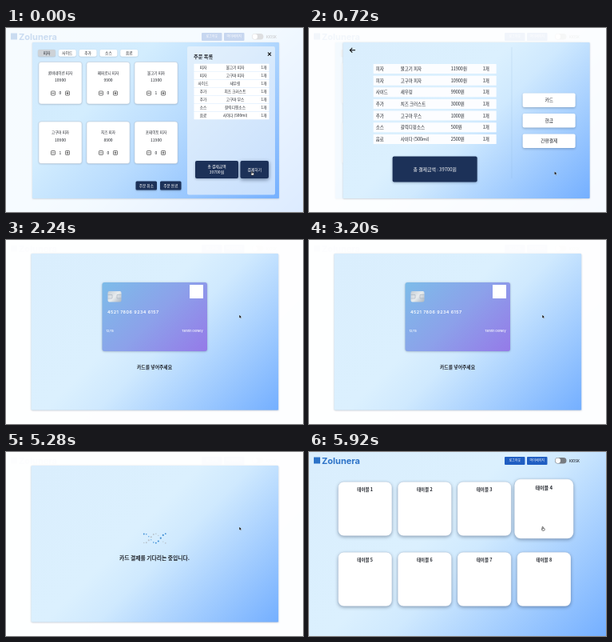
An HTML page with a canvas for the animation above (6 s loop, 372 by 230 pixels).

```html
<!DOCTYPE html>
<html lang="ko">
<head>
<meta charset="utf-8">
<title>Kiosk order</title>
<style>
html, body { margin: 0; width: 100%; height: 100%; overflow: hidden; background: #fff; }
canvas { display: block; width: 372px; height: 230px; }
</style>
</head>
<body>
<canvas id="stage"></canvas>
<script>
const W = 372, H = 230, LOOP = 6000;
const KR = '"Noto Sans CJK KR", "Noto Sans CJK", sans-serif';
const LATIN = 'Inter, sans-serif';
const NAVY = '#1c3158', INK = '#20242b';
const canvas = document.getElementById('stage');
const ctx = canvas.getContext('2d');
const dpr = window.devicePixelRatio || 1;
canvas.width = W * dpr;
canvas.height = H * dpr;

const menu = [
  ['콤비네이션 피자', 10900, 0], ['페퍼로니 피자', 9900, 0], ['불고기 피자', 11900, 1],
  ['고구마 피자', 10900, 1], ['치즈 피자', 8900, 0], ['포테이토 피자', 11900, 0]
];
const order = [
  ['피자', '불고기 피자', 11900], ['피자', '고구마 피자', 10900], ['사이드', '새우링', 9900],
  ['추가', '치즈 크러스트', 3000], ['추가', '고구마 무스', 1000],
  ['소스', '갈릭디핑소스', 500], ['음료', '사이다 (500ml)', 2500]
];

const clamp = v => Math.max(0, Math.min(1, v));
const span = (t, from, to) => clamp((t - from) / (to - from));
const easeOut = (p, n = 3) => 1 - (1 - p) ** n;
const easeInOut = p => p * p * (3 - 2 * p);

function text(str, x, y, size, { color = INK, weight = 500, align = 'center', font = KR, gap = 0 } = {}) {
  ctx.font = `${weight} ${size}px ${font}`;
  ctx.textAlign = align;
  ctx.textBaseline = 'alphabetic';
  ctx.letterSpacing = gap + 'px';
  ctx.fillStyle = color;
  ctx.fillText(str, x, y + size * 0.36);
  ctx.letterSpacing = '0px';
}

function box(x, y, w, h, r, fill, { shadow = 0, blur = 3, dy = 1, stroke } = {}) {
  ctx.save();
  if (shadow) {
    ctx.shadowColor = `rgba(30,50,80,${shadow})`;
    ctx.shadowBlur = blur * dpr;
    ctx.shadowOffsetY = dy * dpr;
  }
  ctx.beginPath();
  ctx.roundRect(x, y, w, h, r);
  ctx.fillStyle = fill;
  ctx.fill();
  ctx.restore();
  if (stroke) {
    ctx.strokeStyle = stroke;
    ctx.lineWidth = 0.6;
    ctx.stroke();
  }
}

function line(color, width, ...pts) {
  ctx.beginPath();
  pts.forEach(([x, y], i) => i ? ctx.lineTo(x, y) : ctx.moveTo(x, y));
  ctx.strokeStyle = color;
  ctx.lineWidth = width;
  ctx.stroke();
}

// Same geometry as a CSS 135deg gradient
function diagonal(x, y, w, h, stops) {
  const cx = x + w / 2, cy = y + h / 2, d = (w + h) / 4;
  const g = ctx.createLinearGradient(cx - d, cy - d, cx + d, cy + d);
  stops.forEach(([at, color]) => g.addColorStop(at, color));
  return g;
}

const sky = (x, y, w, h) => diagonal(x, y, w, h,
  [[0, '#daeefd'], [0.42, '#dbf0fe'], [0.55, '#cfe9fe'], [1, '#74afff']]);

function veil(alpha) {
  ctx.fillStyle = `rgba(255,255,255,${alpha})`;
  ctx.fillRect(0, 0, W, H);
}

function panel(x, y, w, h) {
  box(x, y, w, h, 1, sky(x, y, w, h), { shadow: 0.25, blur: 2, dy: 0.5 });
}

function page(t) {
  ctx.fillStyle = sky(0, 0, W, H);
  ctx.fillRect(0, 0, W, H);
  box(6, 6.5, 8, 8, 0, '#2d73c8');
  text('Zolunera', 16, 11, 11, { color: '#2d73c8', weight: 700, align: 'left', font: LATIN });
  ['로그아웃', '마이페이지'].forEach((label, i) => {
    box(245 + 28 * i, 6, 25.5, 10, 1, '#205ec2');
    text(label, 257.8 + 28 * i, 11, 4, { color: '#fff' });
  });
  box(308, 7, 14.5, 7.6, 3.8, '#777c82');
  box(308.6, 7.6, 6.4, 6.4, 3.2, '#fff');
  text('KIOSK', 326, 11, 4.2, { align: 'left', font: LATIN });
  if (t < 5360) return;
  for (let i = 0; i < 8; i++) {
    const cx = 70.2 + 74.7 * (i % 4), cy = i < 4 ? 71 : 159;
    const scale = i === 3 ? 1 + 0.1 * easeOut(span(t, 5460, 5760)) : 1;
    ctx.save();
    ctx.translate(cx, cy);
    ctx.scale(scale, scale);
    box(-33.7, -33.8, 67.4, 67.6, 7, '#fff', { shadow: 0.42, blur: 4, dy: 1.5, stroke: 'rgba(120,150,185,.35)' });
    text('테이블 ' + (i + 1), 0, -24, 5.5, { weight: 700 });
    ctx.restore();
  }
}

function stepper(cx, y, count) {
  [-9, 9].forEach(dx => {
    const x = cx + dx;
    box(x - 2.5, y - 2.5, 5, 5, 0.7, '#fff', { stroke: '#222' });
    line('#222', 0.7, [x - 1.4, y], [x + 1.4, y]);
    if (dx > 0) line('#222', 0.7, [x, y - 1.4], [x, y + 1.4]);
  });
  text(count, cx, y, 5);
}

function orderPanel() {
  box(33, 18, 309, 195, 1, diagonal(33, 18, 309, 195,
    [[0, '#d2eafd'], [0.3, '#d3edfe'], [0.55, '#b9dcfe'], [1, '#75b0ff']]),
    { shadow: 0.25, blur: 2, dy: 0.5 });
  box(227, 23, 110, 185.5, 2, 'rgba(240,246,252,.66)');
  ['피자', '사이드', '추가', '소스', '음료'].forEach((tab, i) => {
    const x = 40 + 25.8 * i;
    box(x, 27, 22, 8.8, 2, i ? '#fff' : '#cdd2d7', { shadow: 0.25, blur: 1.5, dy: 0.4 });
    text(tab, x + 11, 31.3, 4.7);
  });
  menu.forEach(([name, price, count], i) => {
    const cx = 68 + 60 * (i % 3), y = i < 3 ? 42.5 : 117;
    box(cx - 27, y, 54, 52.5, 3, '#fff', { shadow: 0.3, blur: 2, dy: 0.5, stroke: '#c3d1de' });
    text(name, cx, y + 13.6, 4.6);
    text(price, cx, y + 22.7, 5);
    stepper(cx, y + 39, count);
  });
  ['주문 취소', '주문 완료'].forEach((label, i) => {
    box(162.5 + 30.5 * i, 191.5, 26.5, 11, 1.5, NAVY, { shadow: 0.3, blur: 2 });
    text(label, 175.8 + 30.5 * i, 197, 4.7, { color: '#fff' });
  });
  text('주문 목록', 235, 35.5, 6.2, { weight: 700, align: 'left' });
  line('#111', 1.1, [328, 30.6], [332, 34.6]);
  line('#111', 1.1, [332, 30.6], [328, 34.6]);
  order.forEach(([kind, name], i) => {
    const y = 49.5 + 10 * i;
    box(235.5, y - 4.7, 94, 9.4, 0.5, '#fff');
    text(kind, 247, y, 4.7);
    text(name, 287, y, 4.7);
    text('1개', 323, y, 4.7);
  });
  box(237, 166, 54, 22, 2, NAVY, { shadow: 0.35, blur: 3 });
  text('총 결제금액', 264, 173.5, 4.8, { color: '#fff' });
  text('39700원', 264, 180.3, 5, { color: '#fff' });
  box(293.5, 166, 35.5, 22, 2, NAVY, { shadow: 0.6, blur: 5, dy: 1.5 });
  text('결제하기', 311.3, 177, 4.8, { color: '#fff' });
}

function payPanel(shift, pointer) {
  ctx.save();
  ctx.translate(shift, 0);
  panel(33, 18, 309, 195);
  line('rgba(120,165,205,.3)', 0.6, [244.3, 24], [244.3, 188]);
  line('#111', 1.1, [48.3, 27.7], [41.8, 27.7]);
  line('#111', 1.1, [44.6, 24.8], [41.7, 27.7], [44.6, 30.6]);
  order.forEach(([kind, name, price], i) => {
    const y = 51 + 14.65 * i;
    box(71, y - 6, 154, 12, 0.5, '#fcfdff');
    [[kind, 74], [name, 105], [price + '원', 168], ['1개', 208]]
      .forEach(([s, x]) => text(s, x, y, 5.5, { align: 'left' }));
  });
  box(95, 160.5, 106, 32, 2, NAVY, { shadow: 0.35, blur: 3 });
  text('총 결제금액 : 39700원', 148, 176.6, 5.9, { color: '#fff' });
  ['카드', '현금', '간편결제'].forEach((label, i) => {
    const y = 81.5 + 25.5 * i;
    const hover = pointer[1] >= y && pointer[1] < y + 17.5;
    box(258, y, 66, 17.5, 2, hover ? '#f8fafc' : '#fff',
      { shadow: hover ? 0.65 : 0.3, blur: hover ? 5 : 3, dy: 1.2 });
    text(label, 291, y + 8.8, 5.7);
  });
  ctx.restore();
}

function bankCard() {
  box(120.5, 53, 131.5, 86, 3, diagonal(120.5, 53, 131.5, 86,
    [[0, '#7dbce9'], [0.5, '#8ca1ea'], [1, '#957ae8']]), { shadow: 0.35, blur: 2.5, dy: 0.5 });
  box(127.5, 64, 17, 13.5, 2, diagonal(127.5, 64, 17, 13.5, [[0, '#c4ccd4'], [0.5, '#e8ecee'], [1, '#aab5c0']]));
  line('#98a6b4', 0.5, [127.5, 68.5], [133, 68.5], [133, 73], [127.5, 73]);
  line('#98a6b4', 0.5, [144.5, 68.5], [139, 68.5], [139, 73], [144.5, 73]);
  box(230, 56, 17, 17, 0, '#fff');
  const white = { color: '#fff', font: LATIN, align: 'left' };
  text('4521 7806 9234 6157', 127, 90, 5.4, { ...white, weight: 600, gap: 0.45 });
  text('12/15', 125.5, 113.3, 3.9, white);
  text('Tamrin Oelwey', 246.5, 113.3, 3.7, { ...white, align: 'right' });
  text('카드를 넣어주세요', 186, 159, 5.8, { weight: 600 });
}

function spinner(t) {
  const trough = 187 + 26 * (t - 5280) / 1000;
  for (let i = 0; i < 10; i++) {
    const x = 172.8 + 3 * i;
    const a = 2 * Math.PI * (x - trough) / 26;
    [['#b9c4ce', -1], ['#3f8fd6', 1]].forEach(([color, sign]) => {
      const r = 0.85 + 0.25 * sign * Math.sin(a);
      ctx.beginPath();
      ctx.arc(x, 108 + 5.8 * sign * Math.cos(a), r, 0, 7);
      ctx.fillStyle = color;
      ctx.fill();
    });
  }
  text('카드 결제를 기다리는 중입니다.', 186, 132.7, 6.8, { weight: 700 });
}

function cardPanel(t) {
  panel(31.5, 17, 309.5, 195.5);
  if (t < 3600) bankCard();
  else spinner(t);
}

function cursor([x, y], hand) {
  ctx.save();
  ctx.translate(x, y);
  if (hand) {
    box(-1.6, -0.4, 3.6, 3.2, 1.2, '#fff', { stroke: '#222' });
    box(-1.1, -2.2, 1.1, 3, 0.5, '#fff', { stroke: '#222' });
  } else {
    ctx.beginPath();
    [[-0.9, -1.8], [-0.9, 1.9], [0, 1.1], [0.7, 2.4], [1.3, 2.1], [0.7, 0.8], [1.8, 0.8]]
      .forEach(p => ctx.lineTo(...p));
    ctx.closePath();
    ctx.fillStyle = '#111';
    ctx.strokeStyle = '#fff';
    ctx.lineWidth = 0.5;
    ctx.stroke();
    ctx.fill();
  }
  ctx.restore();
}

function draw(t) {
  ctx.setTransform(dpr, 0, 0, dpr, 0, 0);
  const move = easeInOut(span(t, 980, 1540));
  const pointer = [308.5 - 15.3 * move, 181.3 - 85.8 * move];
  page(t);
  if (t < 5360) {
    veil(0.75);
    orderPanel();
    if (t >= 400) {
      veil(0.75 * span(t, 360, 640));
      payPanel(W * (1 - easeOut(span(t, 360, 940), 3.75)), pointer);
    }
    const fade = span(t, 1640, 2000);
    if (fade) {
      veil(0.75 * fade);
      ctx.globalAlpha = easeOut(fade, 2);
      cardPanel(t);
      ctx.globalAlpha = 1;
    }
  }
  const hand = t < 400 || (t >= 1300 && t < 1760) || t >= 5440;
  cursor(pointer, hand);
}

function tick() {
  draw(performance.now() % LOOP);
  requestAnimationFrame(tick);
}
tick();
</script>
</body>
</html>
```
